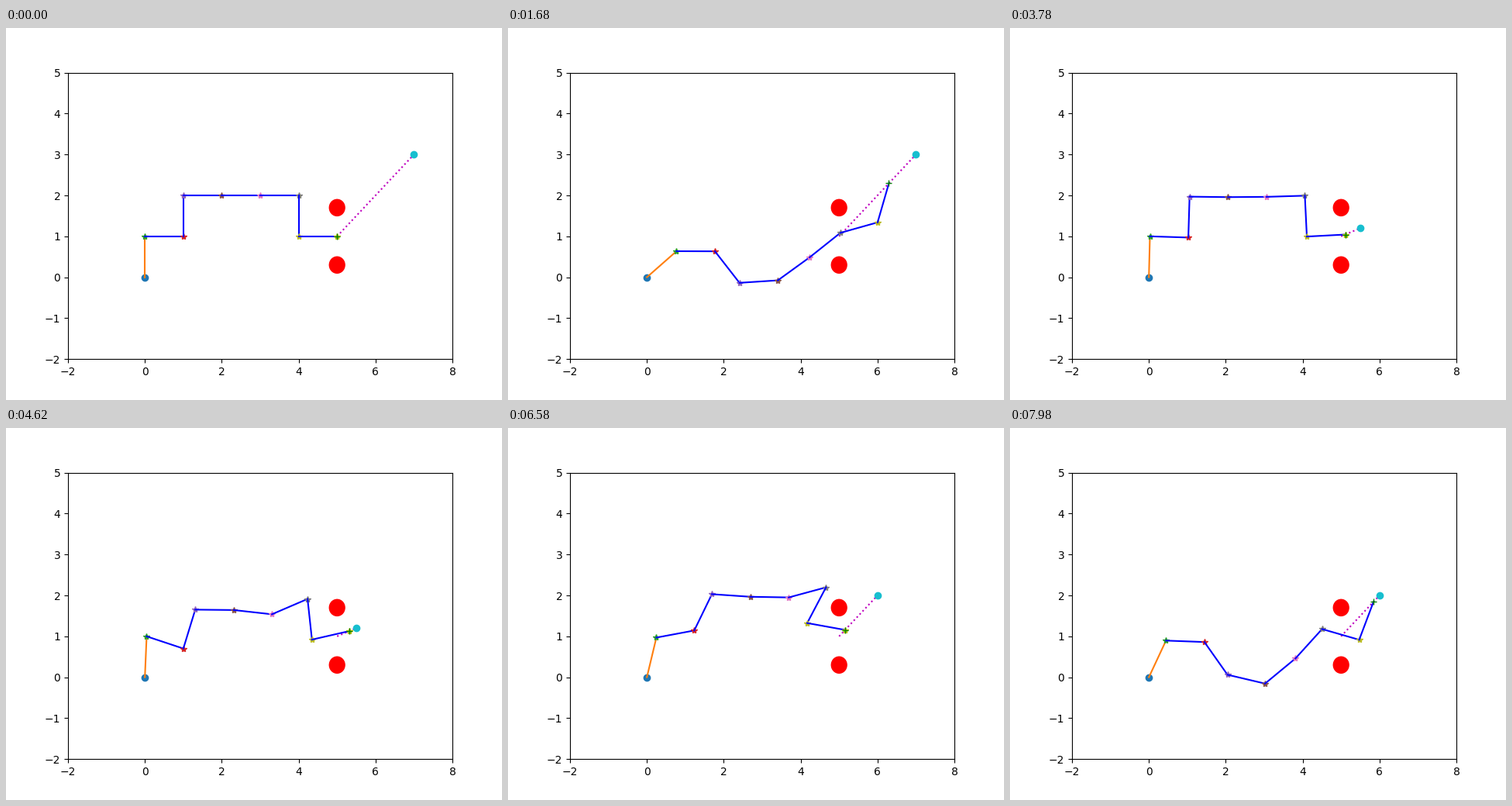
Animation, 640 px wide and 480 px high, one loop 8000 ms. Source, as a matplotlib script:

```python
import numpy as np
import matplotlib.pyplot as plt
from matplotlib.animation import FuncAnimation

INTERVAL, FRAMES = 40, 200      # 8 s loop
STEP_MS, STEPS = 140, 20        # pose changes and length of one reach
START = np.array([5.0, 1.0])
HOME = [90, 0, 90, 0, 0, 0, -90, 0]
OBSTACLES = np.array([[5, 1.7], [5, 0.3]])

# Each reach: goal, then link angles in degrees at certain steps
REACHES = [
    ((7, 3), {0: HOME,
              12: [39.9, -0.5, -51.3, 3.2, 34.5, 37.1, 14.7, 73.7],
              20: [19.4, 11.3, 1.6, 13.8, 7.7, 31.3, 45.6, 56]}),
    ((5.5, 1.2), {0: HOME,
                  6: [88.5, -1.7, 88.2, -0.7, 0.4, 1.6, -87.1, 2.8],
                  18: [82.7, -30.5, 52.7, 1.1, -10.5, 42.4, -75.9, 22.1]}),
    ((6, 2), {0: HOME,
              5: [75.6, 9.8, 62.5, -3.8, -1.1, 14.1, -119.1, -9.8],
              15: [64, -2.2, -53.7, -12.8, 38, 46.3, -15.5, 68.6]}),
]


def joints(q):
    links = np.column_stack([np.cos(q), np.sin(q)])
    return np.vstack([[0, 0], np.cumsum(links, axis=0)])


def solve(q, tip):
    """Nudge the link angles until the arm ends at tip."""
    for _ in range(8):
        jac = np.array([-np.sin(q), np.cos(q)])
        q = q + np.linalg.pinv(jac) @ (tip - joints(q)[-1])
    return q


def pose(step):
    reach, k = divmod(step, STEPS + 1)
    goal, keys = REACHES[reach]
    table = np.radians(list(keys.values()))
    q = np.array([np.interp(k, list(keys), col) for col in table.T])
    s = k / STEPS
    tip = START + (np.array(goal) - START) * s * s * (3 - 2 * s)
    return goal, joints(solve(q, tip))


fig, ax = plt.subplots(figsize=(6.4, 4.8), dpi=100)
ax.set_xlim(-2, 8)
ax.set_ylim(-2, 5)
for center in OBSTACLES:
    ax.add_patch(plt.Circle(center, 0.2, color="r"))

path, = ax.plot([], [], "m:")
ax.plot(0, 0, "o", color="C0")
links = ax.plot([], [], color="C1")
stars = []
for i in range(2, 9):
    stars += ax.plot([], [], "*", color=f"C{i}")
    links += ax.plot([], [], "b")
near, = ax.plot([], [], "y*")
tip_mark, = ax.plot([], [], "g+")
goal_mark, = ax.plot([], [], "o", color="C9")


def update(frame):
    step = (frame * INTERVAL + INTERVAL // 2) // STEP_MS
    goal, pts = pose(step)
    path.set_data([START[0], goal[0]], [START[1], goal[1]])
    for link, a, b in zip(links, pts, pts[1:]):
        link.set_data([a[0], b[0]], [a[1], b[1]])
    for star, p in zip(stars, pts[1:]):
        star.set_data([p[0]], [p[1]])
    tip = pts[-1]
    tip_mark.set_data([tip[0]], [tip[1]])
    near.set_data([tip[0]], [tip[1]])
    gap = np.linalg.norm(OBSTACLES - tip, axis=1).min()
    near.set_visible(bool(gap < 0.75))
    goal_mark.set_data([goal[0]], [goal[1]])
    return [path, *links, *stars, near, tip_mark, goal_mark]


anim = FuncAnimation(fig, update, frames=FRAMES, interval=INTERVAL,
                     repeat=True, repeat_delay=0)
plt.show()
```
